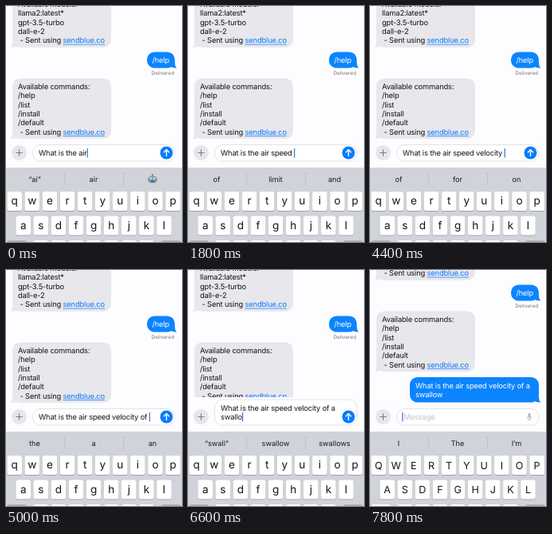
These frames come from a looping animation (221 px wide and 295 px high, 8000 ms). An HTML page with a canvas:

```html
<!DOCTYPE html>
<html lang="en">
<head>
<meta charset="utf-8">
<title>Typing a message</title>
<style>
html, body { margin: 0; width: 100%; height: 100%; overflow: hidden; background: #fdfcff; }
canvas { display: block; width: 221px; height: 295px; }
</style>
</head>
<body>
<canvas id="stage"></canvas>
<script>
const LOOP = 8000, STEP = 200;
const INK = '#151517', BLUE = '#0b84fe', GRAY = '#e8e7eb', PAGE = '#fdfcff', CARET = '#3d70df';
const SENTENCE = 'What is the air speed velocity of a swallow';
const WRAP = 36;

// Start time, typed characters
const TYPING = [
  [0, 15], [400, 16], [800, 17], [1000, 18], [1200, 19], [1400, 20], [1600, 21],
  [1800, 22], [2000, 23], [2200, 24], [2400, 25], [2600, 26], [3200, 31], [4600, 32],
  [4800, 33], [5000, 34], [5200, 35], [5400, 36], [5600, 37], [5800, 38], [6000, 39],
  [6200, 40], [6400, 41], [6600, 42], [6800, 43]
];

// Start time, three suggestions, highlighted middle; "|" toggles faded letters
const SUGGESTIONS = [
  [0, ['“ai”', 'air', 'robot']],
  [400, ['temperature', 'quality', 'conditioned'], true],
  [1000, ['|t|emperatur|e', 'qualit|y', '|c|onditione|d'], true],
  [1200, ['“spe”', 'speed', 'special']],
  [1800, ['of', 'limit', 'and']],
  [2000, ['“v”', 'velocity', 'vs']],
  [2400, ['“vel”', 'velocity', 'velocities'], true],
  [2600, ['“velo”', 'velocity', 'velocities'], true],
  [3200, ['of', 'for', 'on']],
  [4800, ['“of”', 'of', 'off']],
  [5000, ['the', 'a', 'an']],
  [5400, ['car', 'rocket', 'man']],
  [5600, ['c|ar', 'ro|g|le', 'ma| l']],
  [5800, ['“sw”', 'swallow', 'sweet']],
  [6400, ['“swall”', 'swallow', 'swallows']],
  [6800, ['“swallow”', 'swallows', 'swallowtail']],
  [7600, ['I', 'The', 'I’m']]
];

const canvas = document.getElementById('stage');
const ctx = canvas.getContext('2d');
const scale = window.devicePixelRatio || 1;
canvas.width = 221 * scale;
canvas.height = 295 * scale;
ctx.textRendering = 'geometricPrecision';

const current = (list, t) => list.findLast(entry => entry[0] <= t);

function rect(x, y, w, h, color) {
  ctx.fillStyle = color;
  ctx.fillRect(x, y, w, h);
}

function box(x, y, w, h, r, fill, stroke) {
  ctx.beginPath();
  ctx.roundRect(x, y, w, h, r);
  ctx.fillStyle = fill;
  ctx.fill();
  if (stroke) {
    ctx.strokeStyle = stroke;
    ctx.lineWidth = 0.7;
    ctx.stroke();
  }
}

function disc(x, y, r, color) {
  ctx.beginPath();
  ctx.arc(x, y, r, 0, Math.PI * 2);
  ctx.fillStyle = color;
  ctx.fill();
}

function line(color, width, ...points) {
  ctx.beginPath();
  points.forEach(([x, y]) => ctx.lineTo(x, y));
  ctx.strokeStyle = color;
  ctx.lineWidth = width;
  ctx.lineCap = ctx.lineJoin = 'round';
  ctx.stroke();
}

function setFont(size, spacing = 0, weight = 400) {
  ctx.font = `${weight} ${size}px Inter, sans-serif`;
  ctx.letterSpacing = spacing + 'px';
}

// Draws text and returns the x where it ends
function text(str, x, y, color = INK) {
  ctx.fillStyle = color;
  ctx.fillText(str, x, y);
  return x + ctx.measureText(str).width;
}

const bodyFont = () => setFont(9.4, -0.18);

function centered(str, x, y, color) {
  text(str, x - ctx.measureText(str).width / 2, y, color);
}

function bubble(x, y, w, h, color, mine) {
  box(x, y, w, h, 9.5, color);
  const edge = mine ? x + w : x, dir = mine ? 1 : -1, bottom = y + h;
  ctx.beginPath();
  ctx.moveTo(edge, bottom - 8);
  ctx.quadraticCurveTo(edge, bottom - 1.5, edge + dir * 2.5, bottom);
  ctx.quadraticCurveTo(edge - dir * 2, bottom + 0.5, edge - dir * 6, bottom - 2);
  ctx.fill();
}

function received(y, lines) {
  const height = (lines.length + 1) * 11.35 + 7.5;
  bubble(8, y, 124, height, GRAY, false);
  bodyFont();
  lines.forEach((str, i) => text(str, 15, y + 13.5 + i * 11.35));
  const base = y + 13.5 + lines.length * 11.35;
  const start = text('- Sent using ', 17.5, base);
  const end = text('sendblue.co', start, base, '#0a7aff');
  rect(start, base + 1.3, end - start, 0.7, '#0a7aff');
}

function drawChat(t) {
  const shift = t < 7400 ? 0 : t < 7600 ? -2 : t < 7800 ? -36 : -39;
  ctx.save();
  ctx.translate(0, shift);
  received(-12.5, ['Available models:', 'llama2:latest*', 'gpt-3.5-turbo', 'dall-e-2']);
  bubble(177, 57.5, 35, 20, BLUE, true);
  bodyFont();
  text('/help', 183.5, 71, '#fff');
  setFont(6.3, 0, 500);
  text('Delivered', 182.5, 86.3, '#88888c');
  received(90.5, ['Available commands:', '/help', '/list', '/install', '/default']);
  if (t >= 7600) {
    bubble(50, 173, 162, 31.5, BLUE, true);
    bodyFont();
    text(SENTENCE.slice(0, WRAP), 57, 186.5, '#fff');
    text(SENTENCE.slice(WRAP), 57, 197.8, '#fff');
  }
  ctx.restore();
}

function drawCaret(x, y) {
  rect(x, y - 9, 1.2, 11.5, CARET);
}

function drawTyped(t) {
  const count = current(TYPING, t)[1];
  const sending = t >= 7400;
  const [x, y] = sending ? [43, 174.3] : [41, 187];
  const wrapped = count > WRAP;
  const first = sending ? y : wrapped ? y - 11.4 : y;
  bodyFont();
  let end = text(SENTENCE.slice(0, Math.min(count, WRAP)), x, first);
  const last = wrapped ? first + 11.4 : first;
  if (wrapped) end = text(SENTENCE.slice(WRAP, count), x, last);
  if (t >= 2800 && t < 3200) text('city', end + 0.8, last, '#96969a');
  if (!sending) drawCaret(end, last);
}

function drawMic() {
  box(198.6, 178.8, 3, 6.2, 1.5, '#b4b5b9');
  ctx.beginPath();
  ctx.arc(200.1, 183.7, 3, 0, Math.PI);
  ctx.strokeStyle = '#b4b5b9';
  ctx.lineWidth = 0.8;
  ctx.stroke();
  line('#b4b5b9', 0.8, [200.1, 186.7], [200.1, 188.4]);
}

function drawInput(t) {
  const sent = t >= 7600, sending = t >= 7400 && !sent;
  const tall = !sent && current(TYPING, t)[1] > WRAP;
  const top = tall ? 162 : 173.5;
  rect(0, sending ? 164 : top - 3, 221, 40, PAGE);
  disc(16.5, 183.5, 9.5, '#e7e6ea');
  line('#7b7c80', 1.1, [12.8, 183.5], [20.2, 183.5]);
  line('#7b7c80', 1.1, [16.5, 179.8], [16.5, 187.2]);
  box(33.5, top, 178.5, 194 - top, 10, '#fff', '#d9d9de');
  if (sending) box(36, 161, 176.5, 30, 9, '#fff');

  if (sent) {
    bodyFont();
    text('Message', 42.5, 187, '#c2c2c6');
    drawCaret(40.3, 187);
    drawMic();
    return;
  }
  drawTyped(t);
  disc(201.5, 183.5, 8, sending ? '#a6cdf8' : '#087cfb');
  line('#fff', 1.4, [201.5, 187.4], [201.5, 179.8]);
  line('#fff', 1.4, [198.4, 182.7], [201.5, 179.6], [204.6, 182.7]);
}

function drawRobot(x, y) {
  line('#7d8f9b', 1, [x, y - 4], [x, y - 6]);
  disc(x, y - 5.6, 1, '#d9534b');
  rect(x - 5.6, y - 1.2, 11.2, 3.6, '#d0584f');
  box(x - 4.5, y - 4, 9, 8.8, 2, '#6fa3bd');
  disc(x - 2, y - 1, 1.2, '#f5e6b0');
  disc(x + 2, y - 1, 1.2, '#f5e6b0');
  rect(x - 2.5, y + 2, 5, 1.3, '#394a55');
}

function drawSuggestions(t) {
  const [, words, highlighted] = current(SUGGESTIONS, t);
  if (highlighted) box(73.2, 205.5, 74, 22.5, 4, '#e6e7ec');
  else [73.5, 147].forEach(x => rect(x, 208, 0.7, 16, '#b9bbc3'));
  setFont(9.2);
  words.forEach((word, i) => {
    const center = 36 + i * 74;
    if (word === 'robot') return drawRobot(center, 216.5);
    let x = center - ctx.measureText(word.replaceAll('|', '')).width / 2;
    word.split('|').forEach((part, n) => {
      x = text(part, x, 219.5, n % 2 ? '#94969d' : '#1c1c1e');
    });
  });
}

function key(x, y, w, color = '#fff') {
  box(x, y + 0.8, w, 24, 2.8, '#8f9198');
  box(x, y, w, 24, 2.8, color);
}

function drawKeyboard(t) {
  const upper = t >= 7600;
  rect(0, 202, 221, 93, '#d1d3da');
  drawSuggestions(t);
  ['qwertyuiop', 'asdfghjkl', 'zxcvbnm'].forEach((letters, row) => {
    const start = [10.7, 21.7, 43.8][row], y = 232 + row * 30.5;
    [...letters].forEach((letter, i) => {
      const x = start + i * 22.1;
      key(x - 9.3, y, 18.6);
      setFont(upper ? 12.6 : 13.6);
      centered(upper ? letter.toUpperCase() : letter, x, y + (upper ? 16.6 : 16.1), INK);
    });
  });
  key(1.5, 293, 24.5, upper ? '#fff' : '#abb0ba');
  key(195, 293, 24.5, '#abb0ba');
}

function frame(now) {
  const t = Math.floor(now % LOOP / STEP) * STEP;
  ctx.setTransform(scale, 0, 0, scale, 0, 0);
  rect(0, 0, 221, 295, PAGE);
  drawChat(t);
  drawInput(t);
  drawKeyboard(t);
  requestAnimationFrame(() => frame(performance.now()));
}
frame(performance.now());
</script>
</body>
</html>
```
